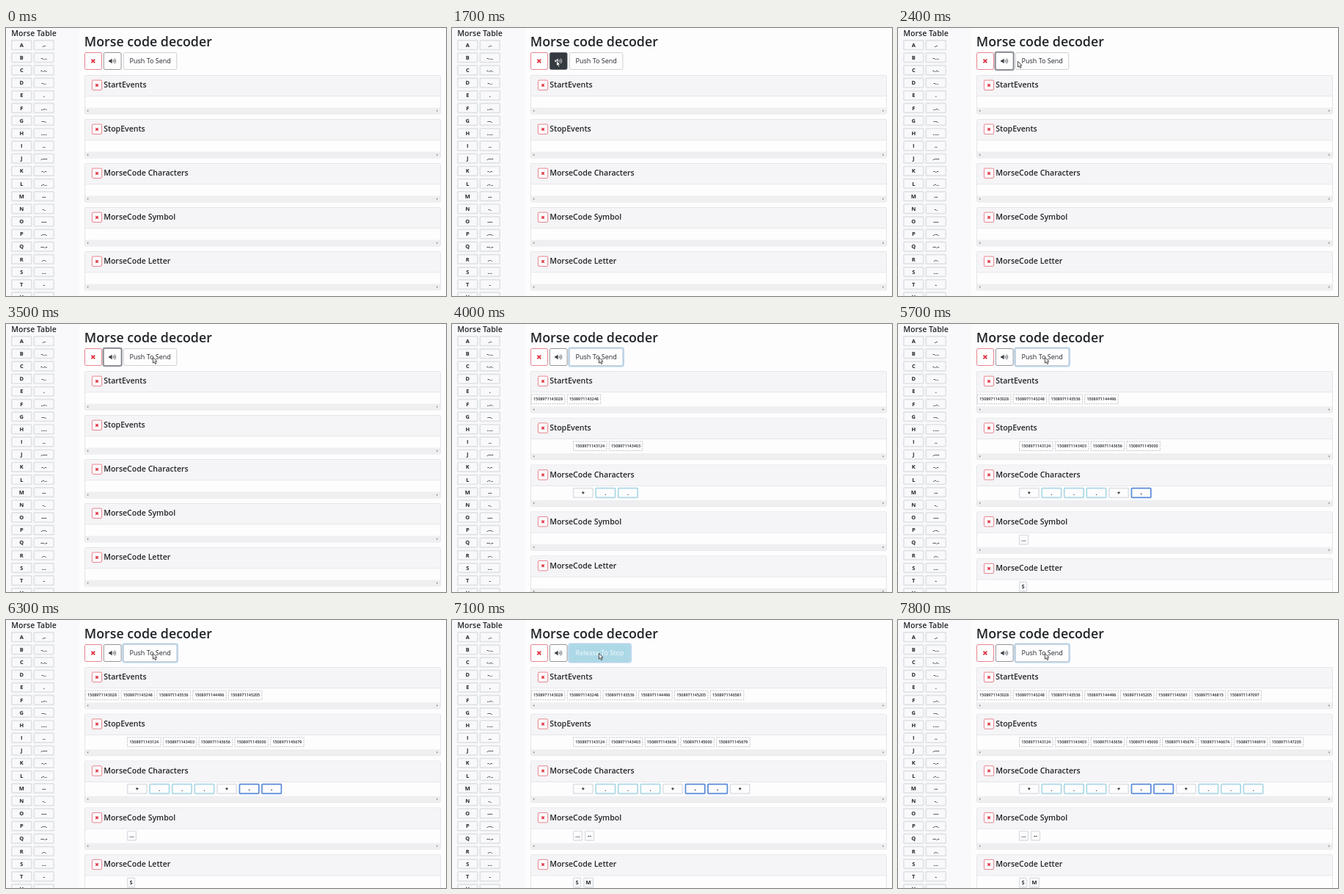
An HTML page that plays this animation: 600x365 px, repeating every 8000 ms.

```html
<!DOCTYPE html>
<html lang="en">
<head>
<meta charset="utf-8">
<title>Morse code decoder</title>
<style>
  html, body { margin: 0; height: 100%; overflow: hidden; background: #fdfdfe; }
  svg { display: block; width: 600px; height: 365px; font-family: "Open Sans", "Noto Sans", sans-serif; fill: #212529; }
  .title { font-size: 17.8px; font-weight: 600; }
  .head { font-size: 10.55px; font-weight: 600; }
  .push { font-size: 9px; }
  .cell { font-size: 7.4px; font-weight: 700; text-anchor: middle; font-kerning: none; }
  .stamp { font-size: 5.4px; font-weight: 600; text-anchor: middle; }
</style>
</head>
<body>
<svg id="stage" viewBox="0 0 600 365"></svg>
<script>
const stage = document.getElementById('stage');
const LOOP = 8000, STEP = 100, EPOCH = 1508971143000, DELAY = 504;
const RED = '#dc3545', PAPER = [253, 253, 254], DARK = [52, 58, 64];
const GREY = '#dfe2e6', SKY = '#add8e6', BLUE = '#5b8ad8';

// Key press and release times, in ms after EPOCH
const downs = [28, 248, 536, 1496, 2205, 3581, 3815, 4097];
const ups = [124, 403, 656, 2000, 2679, 3674, 3919, 4205];
const LONG_PRESS = 300, LONG_GAP = 600;
const SHOW_FROM = 3000 + DELAY;

const morse = ['.-', '-...', '-.-.', '-..', '.', '..-.', '--.', '....', '..', '.---', '-.-',
  '.-..', '--', '-.', '---', '.--.', '--.-', '.-.', '...', '-', '..-'];

// Pointer stops: time, x, y
const pointer = [[800, 130, 3], [900, 129, 25], [1100, 139, 36], [1200, 142, 44],
  [2200, 154, 45], [2300, 163, 45], [2900, 182, 45], [3000, 200, 45]];

const clamp = v => Math.max(0, Math.min(1, v));
const mix = (a, b, k) => `rgb(${a.map((v, i) => Math.round(v + (b[i] - v) * k))})`;
const text = (x, y, cls, s, fill = '#212529') => `<text x="${x}" y="${y}" class="${cls}" fill="${fill}">${s}</text>`;
const rect = (x, y, w, h, fill, stroke = 'none', sw = 1, r = 0, extra = '') =>
  `<rect x="${x}" y="${y}" width="${w}" height="${h}" rx="${r}" fill="${fill}" stroke="${stroke}" stroke-width="${sw}" ${extra}/>`;
const cross = (x, y, r, w) =>
  `<path d="M${x - r} ${y - r}l${2 * r} ${2 * r}m0 ${-2 * r}l${-2 * r} ${2 * r}" stroke="${RED}" stroke-width="${w}"/>`;
const cell = (x, y, w, s, border = GREY) =>
  rect(x + .8, y - 6.3, w - 1.6, 12.6, 'none', border, 1.7, .8) + text(x + w / 2, y + 2.6, 'cell', s);
const stamp = (x, y, ms) =>
  rect(x + .5, y - 6.3, 45.5, 12.6, 'none', '#b4b7ba', .8, 0, 'stroke-dasharray="2 1.2"') +
  text(x + 23.2, y + 1.9, 'stamp', EPOCH + ms);

function sidebar() {
  let s = rect(0, 0, 100, 365, '#f9f9fb') + text(7.3, 10.7, 'head', 'Morse Table');
  morse.forEach((code, i) => {
    const y = 23.2 + i * 17.16;
    s += cell(7, y, 28.5, String.fromCharCode(65 + i)) + cell(37.5, y, 28.5, code);
  });
  return s;
}

function buttons(t, pressed) {
  const dark = clamp((t - 1050) / 150) - clamp((t - 2150) / 150);
  const ink = mix(DARK, PAPER, dark);
  const focus = t >= SHOW_FROM;
  let s = rect(107.5, 33.5, 23, 23, 'none', RED, .6, 2) + cross(118.8, 45, 2.4, 1.8);
  if (t >= 1800 && !focus) s += rect(132.3, 32.5, 25.6, 25, 'none', '#94989c', 1.6, 2.5);
  s += rect(133.3, 33.5, 23.8, 23, mix(PAPER, DARK, dark), '#4a5056', .6, 2);
  s += `<path d="M140.3 43.7h1.7l2.5-2.3v7.2l-2.5-2.3h-1.7z" fill="${ink}"/>
    <path d="M145.7 43.8q1.2 1.2 0 2.4m1.2-3.7q2.4 2.5 0 5m1.2-6.1q3.2 3.6 0 7.2" fill="none" stroke="${ink}" stroke-width=".7"/>`;
  const w = pressed ? 83 : 73;
  if (focus) s += rect(159.2, 32.4, w + 1.8, 25.2, 'none', '#b4d3ec', 1.8, 2.5);
  s += rect(160.4, 33.5, w - .6, 23, pressed ? SKY : '#fdfdfe', pressed ? SKY : '#c9cbce', .9, 2);
  return s + text(168.6, 48.1, 'push', pressed ? 'Release To Stop' : 'Push To Send', pressed ? '#f6fbfd' : '#212529');
}

function panel(name, y, full) {
  const h = full ? 56.3 : 52.5, bar = y + h - 8.5;
  return rect(107.5, y, 485, h, 'none', '#dfdfe1', .8, 1.5) +
    rect(108, y + .4, 484, 27.8, '#f5f4f6') + rect(108, y + 28, 484, .7, '#dfdfe1') +
    rect(108, bar, 484, 8.2, '#efeff1') +
    `<path d="M112.2 ${bar + 2.7}l-1.6 1.5 1.6 1.5zM587.4 ${bar + 2.7}l1.6 1.5-1.6 1.5z" fill="#777"/>` +
    rect(117.4, y + 6.6, 13.2, 13.4, '#fdfdfe', RED, .6, 1.5) + cross(124, y + 13.4, 1.7, 1.5) +
    text(133.2, y + 16.7, 'head', name);
}

// Symbols heard so far; '*' marks a pause before a key press
function decode(nDown, nUp) {
  const out = [];
  for (let i = 0; i < nDown; i++) {
    if (!i || downs[i] - ups[i - 1] > LONG_GAP) out.push('*');
    if (i < nUp) out.push(ups[i] - downs[i] > LONG_PRESS ? '-' : '.');
  }
  return out;
}

function arrow(t) {
  const at = pointer.filter(p => p[0] <= t).pop();
  return at ? `<path transform="translate(${at[1]} ${at[2]})" d="M.4.4v7.8l1.8-1.6 1.3 2.9 1.4-.6-1.3-2.9h2.3z"
    fill="#fff" stroke="#222" stroke-width=".8"/>` : '';
}

function draw(t) {
  const shown = list => list.filter(ms => ms + SHOW_FROM <= t);
  const d = shown(downs), u = shown(ups), chars = decode(d.length, u.length);
  const words = chars.join('').match(/[.-]+(?=\*)/g) || [];
  const borders = { '*': GREY, '.': SKY, '-': BLUE };
  const row = (list, x, pitch, make) => y => list.map((v, i) => make(x + i * pitch, y, v)).join('');
  const panels = [
    ['StartEvents', d, row(d, 107.8, 48.8, stamp)],
    ['StopEvents', u, row(u, 165, 48.8, stamp)],
    ['MorseCode Characters', chars, row(chars, 164.8, 30.57, (x, y, c) => cell(x, y, 28, c, borders[c]))],
    ['MorseCode Symbol', words, row(words, 164.8, 16, (x, y, w) => cell(x, y, 13.4, w))],
    ['MorseCode Letter', words, row(words, 164.8, 14.2, (x, y, w) => {
      const letter = String.fromCharCode(65 + morse.indexOf(w));
      return cell(x, y, letter === 'M' ? 14.2 : 11.4, letter);
    })]
  ];
  let s = sidebar() + text(106.8, 25.3, 'title', 'Morse code decoder') + buttons(t, d.length > u.length);
  let y = 64.5;
  for (const [name, list, items] of panels) {
    s += panel(name, y, list.length) + items(y + 37.9);
    y += list.length ? 63.8 : 60;
  }
  stage.innerHTML = s + arrow(t);
}

const start = performance.now();
let last = -1;
function tick() {
  const t = Math.floor((performance.now() - start) % LOOP / STEP) * STEP;
  if (t !== last) draw(last = t);
  requestAnimationFrame(tick);
}
tick();
</script>
</body>
</html>
```
